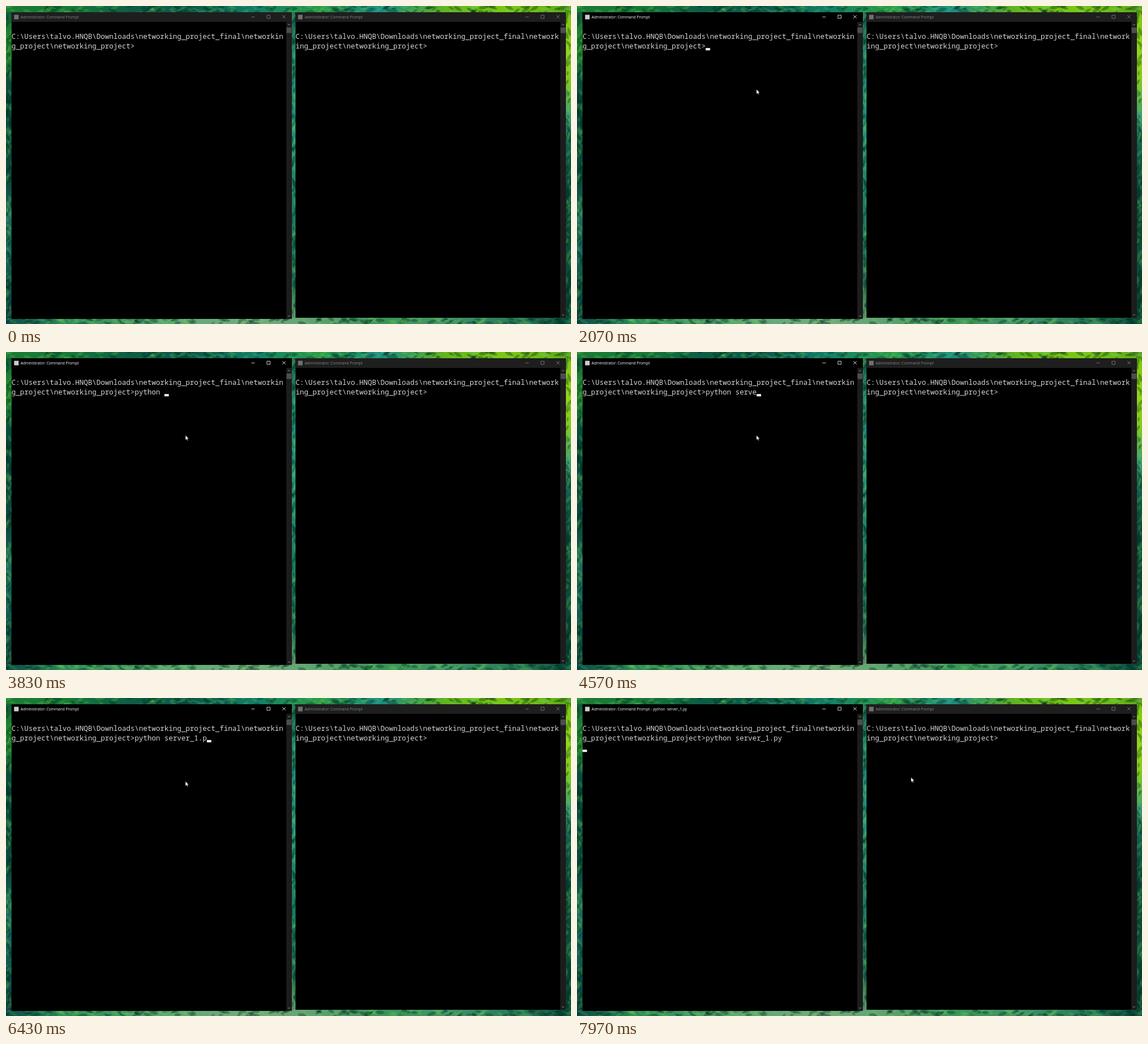
An HTML page with a canvas that plays this animation: 998x561 px, repeating every 8000 ms.

```html
<!DOCTYPE html>
<html lang="en">
<head>
<meta charset="utf-8">
<title>Two consoles</title>
<style>
  html, body { margin: 0; width: 100%; height: 100%; overflow: hidden; background: #0b4638; }
  canvas, svg { position: absolute; left: 0; top: 0; width: 998px; height: 561px; }
  text { white-space: pre; }
  .console { font: 12.5px "Noto Sans Mono", monospace; fill: #d6d6d6; }
  .title { font: 6.6px "Open Sans", sans-serif; fill: var(--ink); }
  .win { --ink: #858585; --bar: #1e1e1e; }
  .win.active { --ink: #fff; --bar: #000; }
  .bar { fill: var(--bar); }
  .icon { fill: var(--ink); opacity: .8; }
  .buttons { fill: none; stroke: var(--ink); stroke-width: .8; }
  .arrows { fill: none; stroke: #999; stroke-width: .9; }
  .track { fill: #1c1c1c; }
  .thumb { fill: #4d4d4d; }
</style>
</head>
<body>
<canvas id="wall" width="998" height="561"></canvas>
<svg id="stage" viewBox="0 0 998 561"></svg>
<script>
const LOOP = 8000;
const COL = 7.5, ROW = 17, BASELINE = 57.7;
const wall = document.getElementById('wall').getContext('2d');
const stage = document.getElementById('stage');

let seed = 17;
const rnd = () => (seed = (seed * 16807) % 2147483647) / 2147483647;

function leaf(x, y, length, angle, color) {
  wall.save();
  wall.translate(x, y);
  wall.rotate(angle);
  wall.fillStyle = color;
  wall.beginPath();
  wall.moveTo(-length / 2, 0);
  wall.quadraticCurveTo(0, -length * .35, length / 2, 0);
  wall.quadraticCurveTo(0, length * .35, -length / 2, 0);
  wall.fill();
  wall.restore();
}

// A strip of wallpaper: evenly spaced colours under light and dark leaves.
function strip(x, y, w, h, colors) {
  const wide = w > h;
  const gradient = wall.createLinearGradient(x, y, wide ? x + w : x, wide ? y : y + h);
  colors.split(' ').forEach((c, i, all) => gradient.addColorStop(i / (all.length - 1), '#' + c));
  wall.save();
  wall.beginPath();
  wall.rect(x, y, w, h);
  wall.clip();
  wall.fillStyle = gradient;
  wall.fillRect(x, y, w, h);
  for (let i = 0; i < Math.max(w, h) / 5; i++) {
    const color = i % 2 ? 'rgba(0, 40, 30, .35)' : 'rgba(110, 215, 90, .22)';
    const angle = (wide ? 0 : Math.PI / 2) + (rnd() - .5) * 1.4;
    leaf(x + rnd() * w, y + rnd() * h, 8 + rnd() * 12, angle, color);
  }
  wall.restore();
}

function paintWall() {
  strip(0, 0, 998, 12, '1c7a34 187838 0d5c44 0c5a4c 148068 2a9a48 1c8c84 62b41c 7cc810 5ca818');
  strip(0, 11, 11, 550, '0f5c3c 2a9c2c 0c4c3c 0a4a3c 0a463c 104c40 1d6a5c 18645a 0c4840 103c38');
  strip(504, 11, 8, 550, '125646 1c7c66 22907a 22907a 1f866e 1c7c64 20805f 28745c 5c8c68');
  strip(988, 11, 10, 550, '7cc40c 98d418 84c81c 3c9c70 0f5848 0a4a3a 0a4636 0e4c38 0c4636 0d4c38');
  strip(0, 550, 998, 11, '0c4a48 2c8a58 4a9c68 64a878 74ac7c 5ca070 3c9458 449468 2c7c58 0f5444');
}

function windowMarkup({ id, x, right, bottom }) {
  const fit = Math.floor((right - 10 - x) / COL);
  const lines = [path.slice(0, fit), path.slice(fit)].map((line, i) =>
    `<text class="console" x="${x}" y="${BASELINE + ROW * i}">${line}</text>`);
  const [close, max, min] = [0, 1, 2].map(i => right - 14 - 27.3 * i);
  const bar = right - 5;
  return `<g class="win" id="${id}">
    <rect x="${x}" y="11" width="${right - x}" height="${bottom - 11}"/>
    <rect class="bar" x="${x}" y="11" width="${right - x}" height="17"/>
    <rect class="icon" x="${x + 4.5}" y="15.5" width="8" height="8"/>
    <text class="title" x="${x + 16}" y="21.7">${TITLE}</text>
    <path class="buttons" d="M${min - 3} 19.3h6 M${max - 2.8} 16.2h5.6v5.6h-5.6z
      M${close - 2.8} 16.2l5.6 5.6m0-5.6l-5.6 5.6"/>
    <rect class="track" x="${right - 10}" y="28" width="10" height="${bottom - 28}"/>
    <rect class="thumb" x="${right - 9.5}" y="38" width="9" height="9.7"/>
    <path class="arrows" d="M${bar - 2} 34l2-2l2 2 M${bar - 2} ${bottom - 6}l2 2l2-2"/>
    ${lines.join('')}
  </g>`;
}

const TITLE = 'Administrator: Command Prompt';
const path = 'C:\\Users\\talvo.HNQB\\Downloads\\networking_project_final\\networking_project\\networking_project>';
const left = 9.8;
const inputX = left + 29 * COL;

stage.innerHTML =
  windowMarkup({ id: 'server', x: left, right: 505, bottom: 552 }) +
  windowMarkup({ id: 'client', x: 511.4, right: 989, bottom: 550 }) +
  `<text class="console" id="typed" x="${inputX}" y="${BASELINE + ROW}"></text>
   <rect id="caret" width="7.8" height="4" fill="#fff"/>
   <path id="mouse" d="M0 0V8.2L1.9 6.5L3.2 9.3L4.5 8.7L3.2 6H5.7Z" fill="#fff" stroke="#000" stroke-width=".4"/>`;

const [server, typed, caret, mouse] =
  ['server', 'typed', 'caret', 'mouse'].map(id => document.getElementById(id));
const serverTitle = server.querySelector('.title');

const FOCUS = 2000, ENTER = 6850, BLINK = 530, KEY_GAP = 120;
const bursts = { 'python ': 3000, 'server': 4080, '_1.p': 5560, 'y': 6600 };
const command = Object.keys(bursts).join('');
const keyTimes = Object.entries(bursts)
  .flatMap(([word, start]) => [...word].map((_, i) => start + i * KEY_GAP));

// Eased progress from 0 to 1 between two times.
function ease(t, start, end) {
  const k = Math.min(1, Math.max(0, (t - start) / (end - start)));
  return k * k * (3 - 2 * k);
}

function render(t) {
  const running = t >= ENTER;
  const count = keyTimes.filter(k => k <= t).length;
  const lastInput = running ? ENTER : keyTimes[count - 1] ?? FOCUS;
  const caretOn = t >= FOCUS && (t - lastInput) % (2 * BLINK) < BLINK;

  server.classList.toggle('active', t >= FOCUS);
  serverTitle.textContent = TITLE + (running ? ' - python  server_1.py' : '');
  typed.textContent = command.slice(0, count);
  caret.setAttribute('x', running ? left : inputX + count * COL);
  caret.setAttribute('y', BASELINE - .5 + ROW * (running ? 2 : 1));
  caret.style.display = caretOn ? '' : 'none';

  const enter = ease(t, 500, 1150), cross = ease(t, 7250, 7800);
  const mouseX = 420 - 103 * enter + 273 * cross;
  const mouseY = 562 - 415 * enter - 7 * cross;
  mouse.setAttribute('transform', `translate(${mouseX} ${mouseY})`);
}

paintWall();
function frame() {
  render(performance.now() % LOOP);
  requestAnimationFrame(frame);
}
frame();
</script>
</body>
</html>
```
